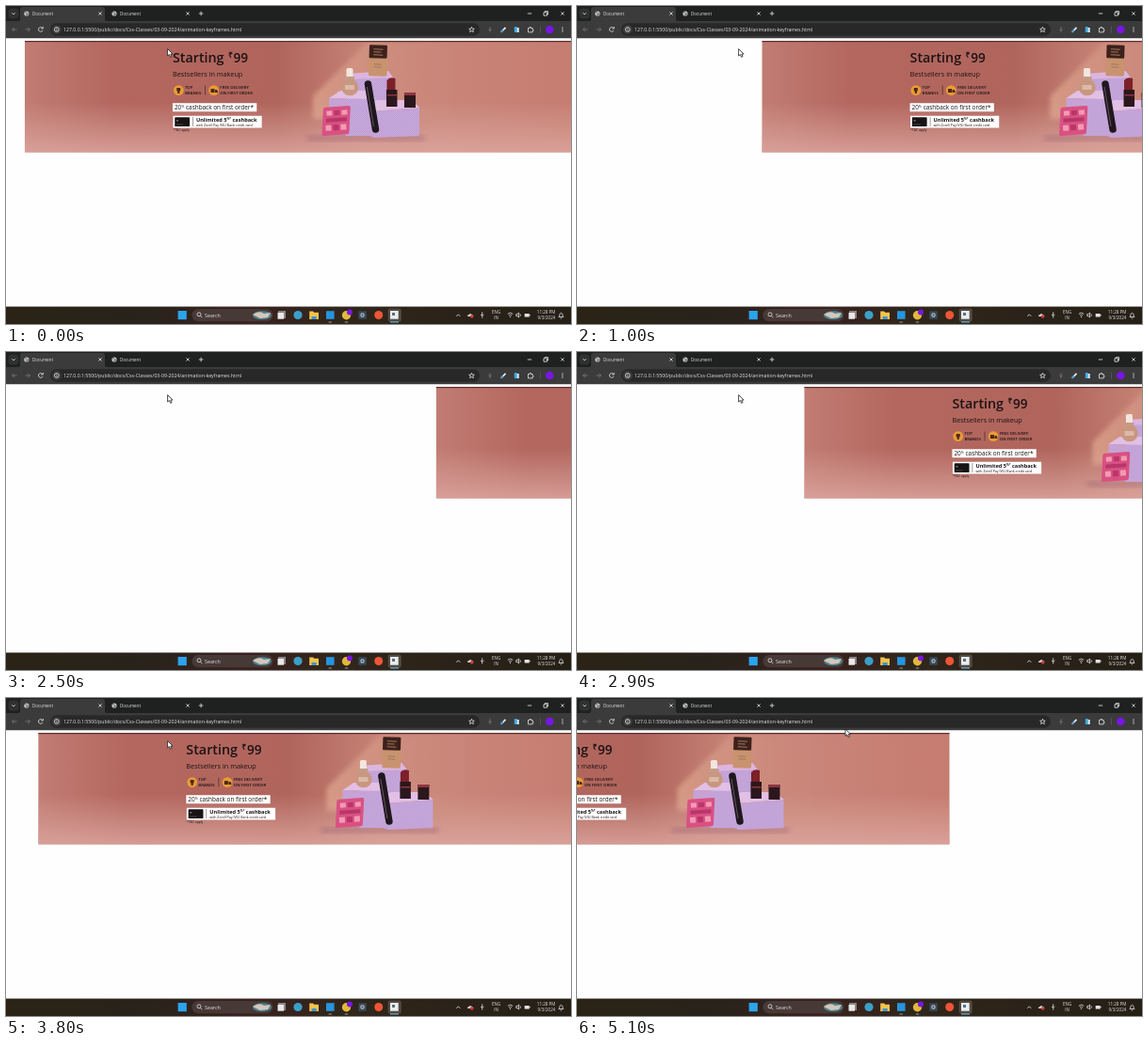
Recreate the animation shown at these times as an HTML page. Size 600x338 px, loop 5.2 s.

```html
<!DOCTYPE html>
<html lang="en">
<head>
<meta charset="utf-8">
<title>Sliding banner</title>
<style>
  html, body { margin: 0; width: 100%; height: 100%; overflow: hidden; background: #fff; }
  svg { display: block; width: 600px; height: 338px; font-family: "Open Sans", sans-serif; }
  .line { fill: none; stroke: #d4d4d4; stroke-width: .9; }
  .dim { stroke: #777; }
  .light { fill: #e4e4e4; }
</style>
</head>
<body>
<svg viewBox="0 0 600 338">
  <defs>
    <linearGradient id="wall">
      <stop offset="0" stop-color="#c17c73"/>
      <stop offset=".16" stop-color="#b3675f"/>
      <stop offset=".45" stop-color="#b0655c"/>
      <stop offset=".6" stop-color="#c58174"/>
      <stop offset=".75" stop-color="#c98578"/>
      <stop offset="1" stop-color="#c67c70"/>
    </linearGradient>
    <linearGradient id="floor" x2="0" y2="1">
      <stop offset=".55" stop-color="#dda9a2" stop-opacity="0"/>
      <stop offset="1" stop-color="#dda9a2" stop-opacity=".8"/>
    </linearGradient>
    <linearGradient id="beam" x2="1">
      <stop offset="0" stop-color="#e0a78f" stop-opacity=".75"/>
      <stop offset="1" stop-color="#d5988a" stop-opacity="0"/>
    </linearGradient>
    <linearGradient id="task">
      <stop offset="0" stop-color="#2b2316"/>
      <stop offset=".25" stop-color="#28231b"/>
      <stop offset=".42" stop-color="#3a211f"/>
      <stop offset=".6" stop-color="#30261b"/>
      <stop offset="1" stop-color="#251f16"/>
    </linearGradient>
    <pattern id="weave" width="2" height="2" patternUnits="userSpaceOnUse">
      <path fill="#b696d0" d="M0 0h2v2H0z"/>
      <path fill="#d1b2e0" d="M0 0h1v1H0zM1 1h1v1H1z"/>
    </pattern>
    <filter id="soft"><feGaussianBlur stdDeviation="2.5"/></filter>
    <g id="globe">
      <circle r="2.6" fill="#c9c9c9"/>
      <path d="M-2 -1Q0-2 .4-.4T-.6 2M1 1.8Q.6.4 2.2 0" fill="none" stroke="#444" stroke-width=".7"/>
    </g>
    <path id="cross" class="line" d="M-1.6-1.6l3.2 3.2m0-3.2l-3.2 3.2"/>
  </defs>

  <path fill="#fefefe" d="M0 34h600v286H0z"/>

  <g id="banner">
    <path fill="url(#wall)" d="M0 37h595v118.5H0z"/>
    <path fill="url(#beam)" d="M364 38L306 96V120H455V38z" filter="url(#soft)"/>
    <path fill="url(#floor)" d="M0 37h595v118.5H0z"/>
    <path fill="#5b2f2d" d="M0 37h595v1.2H0z"/>

    <g fill="#1d1315">
      <text x="157" y="60" font-size="14.3" font-weight="600">Starting</text>
      <text x="216" y="54.5" font-size="8.2" font-weight="600">₹</text>
      <text x="221.6" y="60" font-size="13.6" font-weight="600">99</text>
      <text x="157" y="74.5" font-size="7.3">Bestsellers in makeup</text>
      <g font-size="4.3" font-weight="600">
        <text x="170" y="88.4">TOP</text>
        <text x="170" y="93.8">BRANDS</text>
        <text x="207.4" y="88.4">FREE DELIVERY</text>
        <text x="207.4" y="93.8">ON FIRST ORDER</text>
      </g>
      <path d="M191.3 84.5h.5v10h-.5z"/>
    </g>
    <g fill="#e99b35">
      <circle cx="163.3" cy="89.6" r="5.4"/>
      <circle cx="200.7" cy="89.6" r="5.4"/>
    </g>
    <path fill="#4b2a16" d="M161.3 87h4v3l-1 1v2h-2v-2l-1-1zM197.5 88h4v4h-4zM202 89h2l1 1.4V92h-3z"/>
    <path fill="#fff" d="M157 103.3h89.3v8.9H157zM157.5 116.7h94.2v12.7h-94.2z"/>
    <g fill="#181314">
      <text x="159" y="110.2" font-size="6.4">20<tspan font-size="3.8" dy="-2">%</tspan><tspan dy="2"> cashback on first order*</tspan></text>
      <text x="182" y="122.5" font-size="5.6" font-weight="700">Unlimited 5<tspan font-size="3.2" dy="-1.7">%*</tspan><tspan dy="1.7"> cashback</tspan></text>
      <text x="182" y="127.6" font-size="3.55">with Zorell Pay IVILI Bank credit card</text>
      <text x="157.5" y="133.2" font-size="3.3">*T&amp;C apply</text>
      <rect x="159.3" y="118.3" width="15.8" height="9.8" rx=".6"/>
      <path d="M178.3 118h.4v10h-.4z"/>
    </g>
    <path fill="#777" d="M161 121h2v1.5h-2zM161 125.7h7v.5h-7z"/>

    <path fill="#8c5570" opacity=".3" filter="url(#soft)" d="M300 137h125v7H300z"/>
    <!-- podiums -->
    <path fill="#dcb5df" d="M343 72l43-3 6 8v33h-50z"/>
    <path fill="url(#weave)" d="M340 78l52-2v34h-50z"/>
    <path fill="#e2bfe5" d="M323 98l12-8h33l4 9z"/>
    <path fill="#c6a2d5" d="M323 98l43 2v38l-43-2z"/>
    <path fill="url(#weave)" d="M341 99l25 1v38h-25z"/>
    <path fill="#e2bfe5" d="M364 106l10-6h37l8 8-50 4z"/>
    <path fill="url(#weave)" d="M364 107l7 5 48-4v30l-48 2-7-3z"/>
    <!-- foundation -->
    <g transform="rotate(2 375 58)">
      <rect x="365.5" y="54" width="19.5" height="20.5" rx="1.5" fill="#c9936f"/>
      <rect x="365.5" y="41.5" width="19" height="14" rx="1" fill="#3d211b"/>
      <path stroke="#9f7860" stroke-width="1" d="M370 46h10M370 49h8M370 52h10M371 62h8M371 65h8"/>
    </g>
    <!-- serum -->
    <rect x="341.5" y="66" width="7" height="10" rx="1.5" fill="#f3e5df"/>
    <path fill="#c39c8a" d="M340 75h10v4h-10z"/>
    <ellipse cx="345.3" cy="86.5" rx="9" ry="8.8" fill="#c8977f"/>
    <path fill="#ead1c3" d="M340 84h10v5h-10z" opacity=".6"/>
    <!-- lipstick -->
    <path fill="#7c2029" d="M384.5 90V79q3-4 9-2v13z"/>
    <path fill="#2b171c" d="M384 89h11.5v18H384zM403 92h12v16h-12z"/>
    <path fill="#8e3541" d="M403 92h12v3h-12zM385 94h10v1.5h-10z"/>
    <!-- mascara -->
    <path stroke="#1f171d" stroke-width="7.5" stroke-linecap="round" d="M364.5 83l8 48"/>
    <path stroke="#66535e" stroke-width="1" d="M363.5 86l7 42"/>
    <!-- palette -->
    <g transform="translate(317 108) rotate(-4)">
      <rect width="29" height="30" rx="2" fill="#d95183" transform="skewX(-7)"/>
      <path fill="#f29bb3" d="M3 4h6v5H3zM19 4h6v5h-6zM1 19h6v6H1zM17 19h6v6h-6z"/>
      <path fill="#b93668" d="M11 4h6v5h-6zM2 12h22v4H2zM9 19h6v6H9z"/>
    </g>
  </g>

  <!-- browser -->
  <path fill="#1f2020" d="M0 0h600v17H0z"/>
  <path fill="#3b3b3b" d="M0 16h600v18.3H0zM13 16q2 0 2-2V4q0-3 3-3h84q3 0 3 3v10q0 2 2 2z"/>
  <rect x="2.5" y="2.5" width="11" height="11" rx="3.5" fill="#303131"/>
  <rect x="47" y="18.3" width="456" height="13.4" rx="6.7" fill="#282828"/>
  <path class="line" d="M6.3 7.3L8 9l1.7-1.7M204.8 8h4.6M207.1 5.7v4.6M553.8 8h4.4M571 6.8h3.4v3.4H571zM572.2 6.8V5.6h3.4V9h-1.2"/>
  <use href="#globe" x="21.8" y="8"/>
  <use href="#globe" x="115" y="8"/>
  <use href="#cross" x="100" y="8"/>
  <use href="#cross" x="193" y="8"/>
  <use href="#cross" x="591" y="8"/>
  <g class="light">
    <text x="28" y="9.7" font-size="4.5">Document</text>
    <text x="121" y="9.7" font-size="4.5">Document</text>
    <text x="61" y="26.9" font-size="5.2">127.0.0.1:5500/public/docs/Css-Classes/03-09-2024/animation-keyframes.html</text>
  </g>
  <path class="line dim" d="M11.5 25h-5m2.2-2.2L6.5 25l2.2 2.2M20.5 25h5m-2.2-2.2l2.2 2.2-2.2 2.2"/>
  <path class="line" d="M39 23.7a2.4 2.4 0 1 0 .1 2.2M39.3 22v2h-2"/>
  <circle cx="53.8" cy="25" r="5" fill="#3b3b3b"/>
  <path class="line" stroke-width=".7" d="M51.4 25a2.4 2.4 0 1 0 4.8 0a2.4 2.4 0 1 0-4.8 0M53.8 24.7v1.7M53.8 23.3v.7"/>
  <path class="line" d="M494.5 22.3l.8 1.9 2 .1-1.5 1.3.5 2-1.8-1.1-1.8 1.1.5-2-1.5-1.3 2-.1z"/>
  <path class="line dim" d="M514 22.3v3.5M512.3 25q1.7 2.4 3.4 0M514 26.2v1.6"/>
  <path stroke="#e6edf2" stroke-width="1.8" d="M526 27.5l4.5-4.7"/>
  <path stroke="#4aa2e0" stroke-width="1.8" d="M525.5 28l2.3-2.4"/>
  <path fill="#3da5dd" d="M539.8 22h3v6h-3z"/>
  <path fill="#cce7f5" d="M542.5 23h2.3v5h-2.3z"/>
  <path class="line" d="M554.5 23.5h1.5v-1h1.5v1h1.7v1.7h.8v1.2h-.8v1.5h-4.7z"/>
  <path fill="#666" d="M567 21.5h.6v7h-.6z"/>
  <circle cx="577.3" cy="25" r="4.3" fill="#7816e4"/>
  <path stroke="#ddd" stroke-width="1.3" stroke-linecap="round" d="M591 23v.01M591 25v.01M591 27v.01"/>

  <!-- taskbar -->
  <path fill="url(#task)" d="M0 319.4h600V338H0z"/>
  <path fill="#2ba4ee" d="M182.6 324h9.2v9.2h-9.2z"/>
  <rect x="197.3" y="322" width="86.2" height="13.2" rx="6.6" fill="#473936"/>
  <path class="line" d="M203 327.8a2 2 0 1 0 4 0a2 2 0 1 0-4 0M206.5 329.4l1.8 1.8"/>
  <text class="light" x="211" y="330.5" font-size="5.3">Search</text>
  <ellipse cx="272" cy="328.7" rx="10" ry="4.5" fill="#4b8390"/>
  <path fill="#d6c6ba" d="M262 328q7-5 12-1l7-1-3 5-8 1z"/>
  <path fill="#898585" d="M289 324h8v8h-8z"/>
  <path fill="#e9e9e9" d="M288.5 326h6.5v6.7h-6.5z"/>
  <circle cx="310" cy="328.5" r="4.6" fill="#3b9fc9"/>
  <path fill="#f4c44c" d="M322.2 324.5h4l1 1.2h4.8v7.3h-9.8z"/>
  <path fill="#4292cf" d="M324.5 330h5.2v3h-5.2z"/>
  <path fill="#2795dd" d="M340 324.2h8.6v8.6H340z"/>
  <circle cx="361.5" cy="328.8" r="4.7" fill="#e2b93c"/>
  <circle cx="365" cy="325.6" r="3" fill="#7816e4"/>
  <path fill="#374b5d" d="M374.3 324.3h8.4v8.4h-8.4z"/>
  <path class="line" d="M377 327h3v3h-3z"/>
  <circle cx="395.7" cy="328.5" r="4.5" fill="#ee5537"/>
  <rect x="405.7" y="321.5" width="14" height="14" rx="2" fill="#55493f"/>
  <path fill="#e8edf0" d="M408 324h8.7v8.7H408z"/>
  <path fill="#596f80" d="M410 326h3v3h-3z"/>
  <path fill="#62bde2" d="M408 335.3h9v1.2h-9z"/>
  <path fill="#999" d="M342.5 335.4h3.4v1h-3.4zM359.8 335.4h3.4v1h-3.4z"/>
  <path class="line" d="M478.3 329.8l2-2 2 2M505.7 325.3v3.8M504 328q1.7 2.8 3.4 0M505.7 329.5v2M532.8 327.3q2.7-2.4 5.4 0M534 329q1.5-1.3 3 0M541.8 327.5h1.2l1.6-1.5v5l-1.6-1.5h-1.2zM546 327.3q1 1.2 0 2.6"/>
  <path class="light" d="M535 330h1v1h-1zM550.7 327h5v3.4h-5zM555.9 328h.8v1.3h-.8z"/>
  <path fill="#cfcfcf" d="M490 330q-.2-2 1.7-2 1.2-2 3 0 1.7 0 1.6 2z"/>
  <circle cx="494.7" cy="330" r="1.8" fill="#d53838"/>
  <g class="light" font-size="4.5" text-anchor="middle">
    <text x="520.6" y="327">ENG</text>
    <text x="520.6" y="333">IN</text>
    <text x="583.3" y="327" text-anchor="end">11:28 PM</text>
    <text x="583.3" y="333" text-anchor="end">9/3/2024</text>
  </g>
  <path class="line" d="M587 330.5q1-1 1-3 1.5-2.5 3 0 0 2 1 3zM588.8 332h1.4"/>

  <path id="cursor" fill="#fff" stroke="#202020" stroke-width=".8" stroke-linejoin="round" d="M0 0v7.4l1.8-1.5 1.2 2.8 1.4-.6-1.2-2.7h2.3z"/>
</svg>
<script>
  const LOOP = 5200, STEP = 100, HALF = 2500, REACH = 650, MARGIN = 2.5;
  const banner = document.getElementById('banner');
  const cursor = document.getElementById('cursor');

  // [time, animation clock]; the clock is 0 when the banner is furthest right
  const clockKeys = [[0, -1977], [1000, -1034], [2900, 917], [3800, 1811], [4600, 2517], [5100, 3017]];
  const cursorX = [[4300, 171.6], [4600, 202.2], [5100, 285]];
  const cursorY = [[4300, 45.6], [4600, 41.6], [5100, 33]];

  function track(keys, t) {
    if (t <= keys[0][0]) return keys[0][1];
    for (let i = 1; i < keys.length; i++) {
      const [t0, v0] = keys[i - 1], [t1, v1] = keys[i];
      if (t <= t1) return v0 + (v1 - v0) * (t - t0) / (t1 - t0);
    }
    return keys[keys.length - 1][1];
  }

  // CSS "ease": cubic-bezier(.25, .1, .25, 1)
  function ease(x) {
    let lo = 0, hi = 1, s = .5;
    for (let i = 0; i < 24; i++) {
      if (.75 * s * (1 - s) + s ** 3 < x) lo = s; else hi = s;
      s = (lo + hi) / 2;
    }
    return .3 * s * (1 - s) ** 2 + 3 * s * s * (1 - s) + s ** 3;
  }

  function slide(clock) {
    return clock < HALF
      ? REACH * (1 - ease(Math.abs(clock) / HALF))
      : -REACH * ease((clock - HALF) / HALF);
  }

  const start = performance.now();
  function draw() {
    const elapsed = Math.max(0, performance.now() - start) % LOOP;
    const t = Math.floor(elapsed / STEP) * STEP;
    banner.setAttribute('transform', `translate(${MARGIN + slide(track(clockKeys, t))})`);
    cursor.setAttribute('transform', `translate(${track(cursorX, t)} ${track(cursorY, t)})`);
    requestAnimationFrame(draw);
  }
  draw();
</script>
</body>
</html>
```
